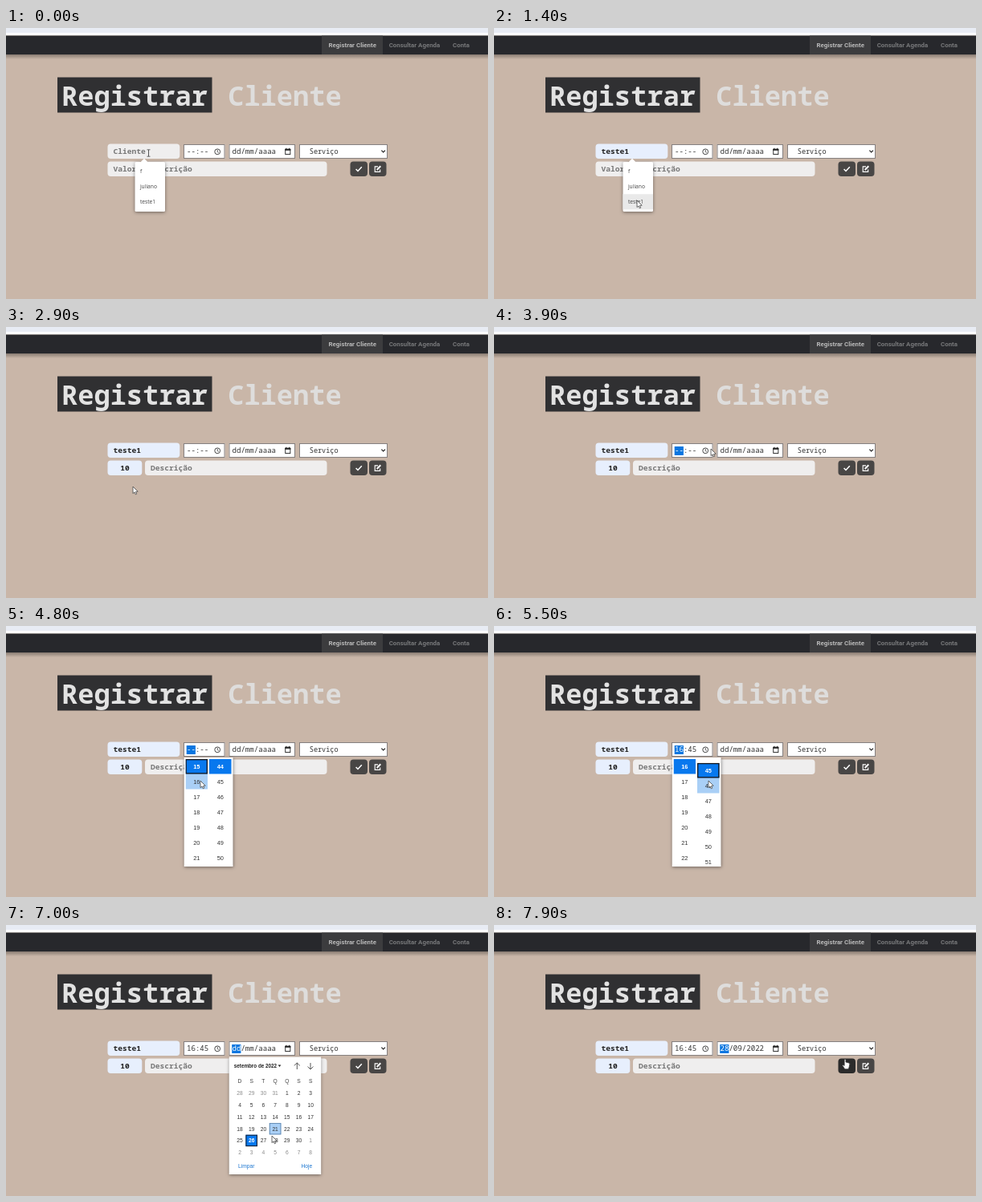
An HTML page with a canvas for the animation above (8000 ms loop, 600 by 338 pixels).

```html
<!DOCTYPE html>
<html lang="pt-BR">
<head>
<meta charset="utf-8">
<title>Registrar Cliente</title>
<style>
html, body { margin: 0; width: 100%; height: 100%; overflow: hidden; background: #c9b6a8; }
canvas { display: block; width: 100vw; height: 100vh; }
</style>
</head>
<body>
<canvas id="stage" width="600" height="338"></canvas>
<script>
const ctx = document.getElementById('stage').getContext('2d');
const LOOP = 8000, STEP = 100;
const MONO = '"Noto Sans Mono", "DejaVu Sans Mono", monospace';
const NAV = 'Roboto, sans-serif';
const UI = '"Open Sans", "Noto Sans", sans-serif';
const ARIAL = '"Liberation Sans", Arial, sans-serif';
const BLUE = '#0a76e0', HOVER = '#a9cff6', FILLED = '#e7effd', PLAIN = '#efeeee';

// time, x, y, pointer shape
const PATH = [
  [0, 177.5, 156, 'beam'], [500, 177.5, 156, 'beam'], [700, 176, 172, 'arrow'],
  [1100, 178, 210, 'arrow'], [1300, 178, 215, 'arrow'], [1600, 178, 215, 'arrow'],
  [1900, 163, 177, 'beam'], [2100, 163, 177, 'beam'], [2300, 169.5, 184, 'beam'],
  [2400, 163, 194, 'arrow'], [2600, 158, 199, 'arrow'], [2900, 158, 199, 'arrow'],
  [3600, 268, 152, 'arrow'], [3800, 270, 152, 'arrow'], [4200, 270, 152, 'arrow'],
  [4600, 245, 190, 'arrow'], [4800, 242, 193, 'arrow'], [5000, 242, 193, 'arrow'],
  [5300, 267, 193, 'arrow'], [5500, 267, 193, 'arrow'], [6000, 353, 156, 'arrow'],
  [6400, 353, 156, 'arrow'], [6900, 333, 255, 'arrow'], [7000, 331, 263, 'arrow'],
  [7200, 332, 265, 'arrow'], [7400, 332, 265, 'arrow'], [7800, 437, 167, 'hand'],
  [8000, 437, 167, 'hand']
];

const smooth = p => p * p * (3 - 2 * p);
const clamp = v => Math.max(0, Math.min(1, v));

function pointerAt(t) {
  let i = 0;
  while (i < PATH.length - 2 && PATH[i + 1][0] <= t) i++;
  const [t0, x0, y0, shape] = PATH[i], [t1, x1, y1] = PATH[i + 1];
  const p = smooth(clamp((t - t0) / (t1 - t0)));
  return { x: x0 + (x1 - x0) * p, y: y0 + (y1 - y0) * p, shape };
}

function text(s, x, y, font, color, align = 'left') {
  ctx.font = font;
  ctx.fillStyle = color;
  ctx.textAlign = align;
  ctx.fillText(s, x, y);
}

function box(x, y, w, h, color, r = 0) {
  ctx.fillStyle = color;
  ctx.beginPath();
  ctx.roundRect(x, y, w, h, r);
  ctx.fill();
}

function frame(x, y, w, h, color, width = 1) {
  ctx.strokeStyle = color;
  ctx.lineWidth = width;
  ctx.strokeRect(x + width / 2, y + width / 2, w - width, h - width);
}

function line(points, color, width) {
  ctx.strokeStyle = color;
  ctx.lineWidth = width;
  ctx.beginPath();
  points.forEach(([x, y], i) => i ? ctx.lineTo(x, y) : ctx.moveTo(x, y));
  ctx.stroke();
}

function polygon(points, fill, stroke, width = 0.8) {
  ctx.beginPath();
  points.forEach(([x, y], i) => i ? ctx.lineTo(x, y) : ctx.moveTo(x, y));
  ctx.closePath();
  ctx.fillStyle = fill;
  ctx.fill();
  if (!stroke) return;
  ctx.strokeStyle = stroke;
  ctx.lineWidth = width;
  ctx.stroke();
}

function panel(x, y, w, h, r = 0, hollow = false) {
  ctx.save();
  if (hollow) {
    ctx.beginPath();
    ctx.rect(0, 0, 600, 338);
    ctx.rect(x, y, w, h);
    ctx.clip('evenodd');
  }
  ctx.shadowColor = 'rgba(0,0,0,.45)';
  ctx.shadowBlur = 4;
  ctx.shadowOffsetY = 1;
  box(x, y, w, h, '#fff', r);
  ctx.restore();
}

function drawPage() {
  box(0, 0, 600, 338, '#c9b6a8');
  box(0, 0, 600, 6, '#e8ecf4');
  box(0, 6, 600, 3.5, '#fdfdfe');
  const shade = ctx.createLinearGradient(0, 33, 0, 39);
  shade.addColorStop(0, 'rgba(0,0,0,.32)');
  shade.addColorStop(1, 'rgba(0,0,0,0)');
  box(0, 33, 600, 6, shade);
  box(0, 9.5, 600, 23.5, '#27282c');
  box(393, 9.5, 76, 23.5, '#3c3c3e');
  const nav = 'bold 7.9px ' + NAV;
  text('Registrar Cliente', 401.5, 23.6, nav, '#b9b9b9');
  text('Consultar Agenda', 476.7, 23.6, nav, '#77787a');
  text('Conta', 556, 23.6, nav, '#77787a');

  const title = 'bold 33.7px ' + MONO;
  box(64, 61.5, 192.5, 44, '#303032');
  text('Registrar', 69, 97, title, '#e2e2e2');
  text('Cliente', 276.2, 97, title, '#dedddc');
}

function drawInput(x, y, w, value, hint, center) {
  box(x, y, w, 18.5, value ? FILLED : PLAIN, 4);
  text(value || hint, center ? x + w / 2 : x + 7, y + 12.7, 'bold 9.6px ' + MONO,
    value ? '#222' : '#777', center ? 'center' : 'left');
}

function drawPicker(x, w, value, picked) {
  box(x, 145, w, 18, '#fff');
  frame(x, 145, w, 18, '#858080');
  const font = '9.1px ' + MONO;
  text(value, x + 4, 157.2, font, '#333');
  if (picked) {
    box(x + 3.7, 149, 11.2, 11, BLUE);
    text(value.slice(0, 2), x + 4, 157.2, font, '#fff');
  }
}

function drawButtons(hot) {
  box(428.5, 166.5, 21.5, 18.5, hot ? '#2b2b2b' : '#484645', 4);
  box(452, 166.5, 21.5, 18.5, '#484645', 4);
  line([[435.6, 176], [438, 178.5], [442.8, 173.2]], '#fff', 1.5);
  line([[463, 172.9], [459.2, 172.9], [459.2, 179.4], [465.7, 179.4], [465.7, 176.6]], '#fff', 1.1);
  line([[461.7, 177], [466.3, 172.3]], '#fff', 2);
}

function drawForm(t) {
  drawInput(126.5, 144.5, 89.8, t >= 1200 ? 'teste1' : '', 'Cliente');
  drawInput(126.5, 166.5, 42.8, t >= 2500 ? '10' : '', 'Valor', true);
  drawInput(173, 166.5, 226.5, '', 'Descrição');
  if (t >= 100 && t < 600) box(133.4, 149, 0.8, 10, '#333');
  if (t >= 2100 && t < 2500) box(147.5, 170.5, 0.9, 10.5, '#333');

  const time = t < 5000 ? '--:--' : t < 5400 ? '16:44' : '16:45';
  drawPicker(221, 51.5, time, t >= 3700 && t < 6000);
  ctx.strokeStyle = '#333';
  ctx.lineWidth = 0.9;
  ctx.beginPath();
  ctx.arc(263.2, 154.3, 3.4, 0, Math.PI * 2);
  ctx.stroke();
  line([[263.2, 152], [263.2, 154.5], [264.8, 155.4]], '#333', 0.8);

  drawPicker(277.5, 82.5, t < 7400 ? 'dd/mm/aaaa' : '28/09/2022', t >= 6000);
  frame(347.3, 150.8, 7, 7.2, '#222', 0.9);
  box(347.3, 150.8, 7, 2, '#222');
  box(348.4, 149.8, 1, 1.5, '#222');
  box(352.2, 149.8, 1, 1.5, '#222');

  box(365, 145, 110, 18, '#fff');
  frame(365, 145, 110, 18, '#858080');
  text('Serviço', 377.8, 157.2, '8.5px ' + MONO, '#333');
  line([[467.4, 152.6], [469.7, 155], [472, 152.6]], '#222', 1.2);

  drawButtons(t >= 7800);
}

function drawSuggestions(x, y, items, h, arrowX, pointer) {
  panel(x, y, 37.5, h, 1.5);
  polygon([[arrowX - 4.5, y + 0.3], [arrowX, y - 4.2], [arrowX + 4.5, y + 0.3]], '#fff');
  items.forEach((item, i) => {
    const top = y + 2.2 + i * 19;
    if (pointer.y >= top && pointer.y < top + 19) box(x, top, 37.5, 19, '#e9e9e9');
    text(item, x + 6.4, top + 11.8, '6.7px ' + UI, '#444');
  });
}

function drawColumn(x, first, chosen, scroll, focus, pointer) {
  ctx.save();
  ctx.beginPath();
  ctx.rect(x, 165, 28, 134.5);
  ctx.clip();
  for (let i = 0; i < 9; i++) {
    const n = first + i, top = 166 + (i - scroll) * 19, on = n === chosen;
    const over = pointer.x >= x && pointer.x < x + 28 && pointer.y >= top && pointer.y < top + 19;
    if (on || over) box(x, top, 27.5, 18.5, on ? '#0878ee' : HOVER);
    if (on && focus) frame(x, top, 27.5, 18.5, '#15171c', 1.3);
    text(n, x + 13.8, top + 11.8, (on ? 'bold ' : '') + '7.4px ' + ARIAL, on ? '#fff' : '#333', 'center');
  }
  ctx.restore();
}

function drawTimeList(t, pointer) {
  panel(221.7, 164, 60.8, 136, 0, t < 4100);
  if (t < 4100) return;
  const hour = t >= 5000, minute = t >= 5400;
  drawColumn(223.5, 15, hour ? 16 : 15, smooth(clamp((t - 4900) / 300)), !minute, pointer);
  drawColumn(253, 44, minute ? 45 : 44, smooth(clamp((t - 5300) / 300)), minute, pointer);
}

function drawCalendar(t, pointer) {
  panel(277.7, 164.5, 114.5, 146.5, 0, t < 6300);
  if (t < 6300) return;
  text('setembro de 2022', 283.8, 178, 'bold 6.3px ' + ARIAL, '#222');
  polygon([[338.6, 174.6], [342.4, 174.6], [340.5, 176.9]], '#222');
  for (const [x, d] of [[362.3, -1], [379, 1]]) {
    line([[x, 176 - 4 * d], [x, 176 + 4 * d]], '#444', 0.9);
    line([[x - 3.5, 176 + 0.6 * d], [x, 176 + 4 * d], [x + 3.5, 176 + 0.6 * d]], '#444', 0.9);
  }
  const dx = 14.7, dy = 14.75, font = '6.7px ' + ARIAL;
  [...'DSTQQSS'].forEach((d, i) => text(d, 291 + i * dx, 197.2, font, '#444', 'center'));
  const col = Math.floor((pointer.x - 283.7) / dx), row = Math.floor((pointer.y - 202.7) / dy);
  for (let i = 0; i < 42; i++) {
    const c = i % 7, r = Math.floor(i / 7), n = i - 3;
    const day = n < 1 ? n + 31 : n > 30 ? n - 30 : n;
    const today = n === 26, left = 283.7 + c * dx, top = 202.7 + r * dy;
    if (today) {
      box(left, top, 14.6, 14.4, '#0878ee');
      frame(left, top, 14.6, 14.4, '#14243a', 1.1);
    } else if (c === col && r === row) {
      box(left, top, 14.6, 14.4, HOVER);
      frame(left, top, 14.6, 14.4, '#5c84ad', 0.9);
    }
    text(day, left + 7.3, top + 9.7, (today ? 'bold ' : '') + font,
      today ? '#fff' : n < 1 || n > 30 ? '#8b8b8b' : '#333', 'center');
  }
  text('Limpar', 289, 302.6, font, '#1f78d1');
  text('Hoje', 367.5, 302.6, font, '#1f78d1');
}

function drawPointer({ x, y, shape }) {
  ctx.save();
  ctx.translate(x, y);
  ctx.lineJoin = 'round';
  if (shape === 'beam') {
    line([[0, -4], [0, 4]], '#444', 0.9);
    line([[-2, -4.2], [2, -4.2]], '#444', 0.8);
    line([[-2, 4.2], [2, 4.2]], '#444', 0.8);
  } else if (shape === 'arrow') {
    polygon([[0, 0], [0, 8.6], [2, 6.9], [3.3, 9.8], [4.7, 9.2], [3.5, 6.4], [6.2, 6.2]], '#fff', '#444');
  } else {
    polygon([[-0.9, 0.8], [0, 0], [1, 0.8], [1, 4], [5, 5], [5.8, 6], [5.2, 10],
      [4.2, 12.8], [-0.2, 12.8], [-3.2, 8.4], [-2.6, 7.3], [-0.9, 8.4]], '#fff', '#333');
  }
  ctx.restore();
}

function draw(t) {
  const pointer = pointerAt(t), late = pointerAt(Math.max(0, t - STEP));
  drawPage();
  drawForm(t);
  if (t < 1700) drawSuggestions(160.5, 167, ['f', 'juliano', 'teste1'], 62, 172, t < 600 ? { y: 0 } : pointer);
  if (t >= 2200 && t < 2900) {
    drawSuggestions(137, 190, ['10', '25.00', 'asda', '10.00', 'df', 'dsfsd'], 118, 148, pointer);
  }
  if (t >= 4000 && t < 6000) drawTimeList(t, pointer);
  if (t >= 6200 && t < 7400) drawCalendar(t, late);
  drawPointer(pointer);
}

const start = performance.now();
function tick() {
  const elapsed = (performance.now() - start) % LOOP;
  draw(Math.floor(elapsed / STEP) * STEP);
  requestAnimationFrame(tick);
}
tick();
</script>
</body>
</html>
```
